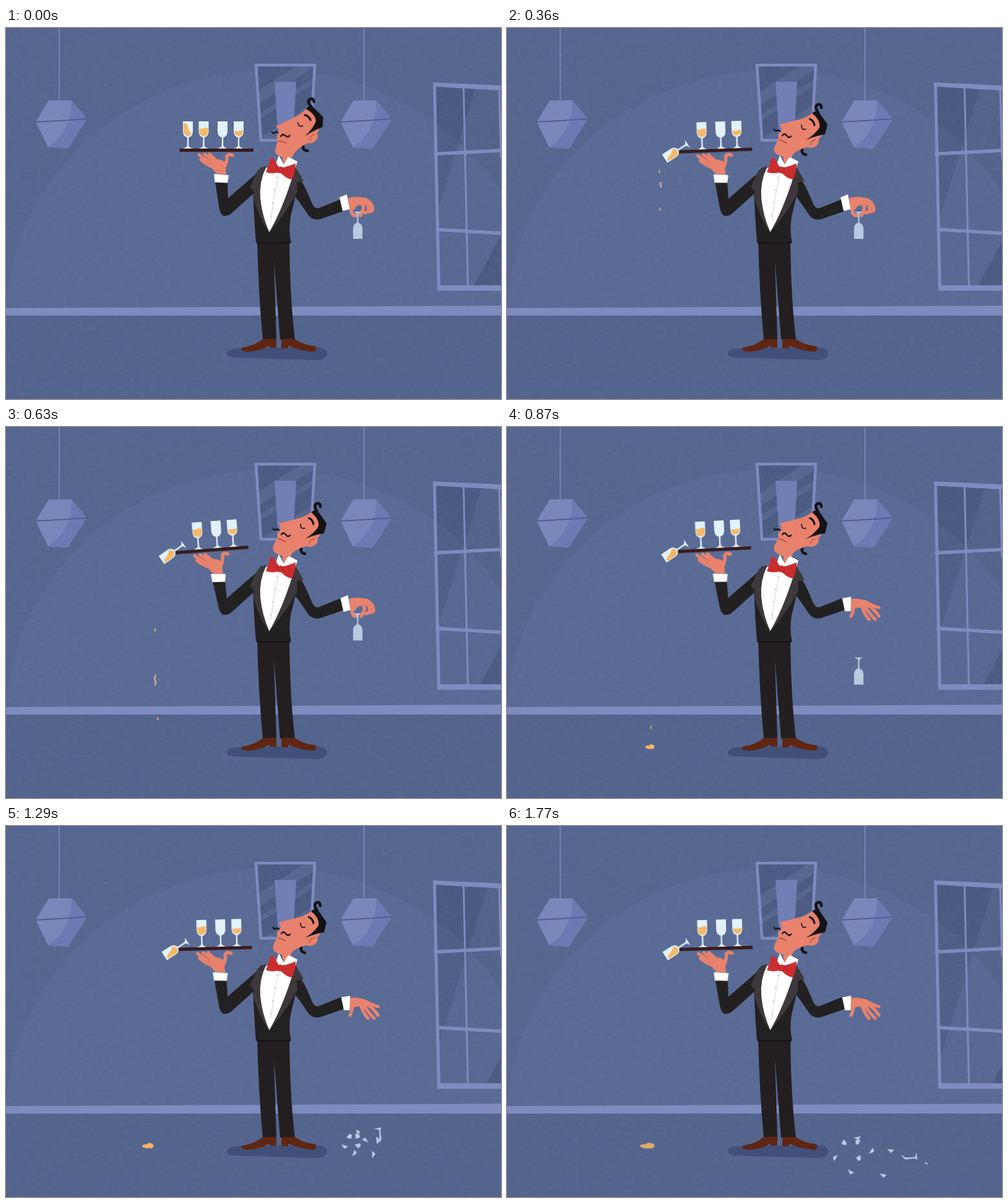
An HTML page that plays this animation: 800 by 600 pixels, repeating every 1800 ms.

```html
<!DOCTYPE html>
<html lang="en">
<head>
<meta charset="utf-8">
<title>Waiter</title>
<style>
html, body { margin: 0; width: 100%; height: 100%; overflow: hidden; background: #55668f; }
svg { position: absolute; inset: 0; width: 100%; height: 100%; display: block; }
.layer { will-change: transform; }
.line { fill: none; stroke-linecap: round; stroke-linejoin: round; }
.skin { fill: #e8826d; }
.line.skin { fill: none; stroke: #e8826d; }
.suit { fill: #232021; }
.lapel { fill: #3c383b; }
.trim { fill: #7f8cc0; }
.hair { fill: #151214; }
.line.hair { fill: none; stroke: #151214; }

.glare, .stripes, .head, .arm, .tipper, .drop, .puddle, .grip, .open, .fall, .shard, .stem, .chip {
  animation: 1.8s linear infinite;
}
.glare { animation-name: glare; }
.stripes { animation-name: stripes; }
.head { animation-name: head; transform-origin: 452px 178px; }
.arm { animation-name: arm; transform-origin: 354px 303px; }
.tipper { animation-name: tip; }
.grip { animation-name: grip; }
.open { animation-name: open; }
.fall { animation-name: fall; }
.puddle { animation-name: puddle; transform-origin: 238px 517px; }
.shard { animation-name: burst; }
.stem { animation-name: stem; }
.chip { animation-name: chip; }

@keyframes glare { to { transform: translateX(28px); } }
@keyframes stripes { to { transform: translateY(12px); } }
@keyframes head {
  0% { transform: rotate(-11deg); animation-timing-function: cubic-bezier(.3, 0, .4, 1); }
  15%, 100% { transform: none; }
}
@keyframes arm {
  0%, 5% { transform: rotate(0deg); animation-timing-function: cubic-bezier(.37, 0, .63, 1); }
  36% { transform: rotate(-4.35deg); animation-timing-function: cubic-bezier(.37, 0, .63, 1); }
  64% { transform: rotate(-.95deg); animation-timing-function: cubic-bezier(.37, 0, .63, 1); }
  85% { transform: rotate(-2.75deg); animation-timing-function: cubic-bezier(.4, 0, .7, .6); }
  100% { transform: rotate(-1.43deg); }
}
@keyframes tip {
  0% { transform: translate(294px, 195px) rotate(0deg); animation-timing-function: cubic-bezier(.4, 0, .8, .6); }
  10% { transform: translate(297px, 184px) rotate(-128deg); }
  13% { transform: translate(296px, 185.5px) rotate(-117deg); }
  16%, 100% { transform: translate(296px, 185px) rotate(-121deg); }
}
/* quadratic ease-in stands for gravity */
@keyframes dropA {
  0% { opacity: 0; transform: translate(248px, 215px); animation-timing-function: step-end; }
  1.7% { opacity: 1; transform: translate(248px, 215px); animation-timing-function: cubic-bezier(.333, 0, .667, .333); }
  37.8% { opacity: 1; transform: translate(244.5px, 515px); animation-timing-function: step-start; }
  37.9%, 100% { opacity: 0; transform: translate(244.5px, 515px); }
}
@keyframes dropB {
  0% { opacity: 0; transform: translate(250px, 215px) scaleY(.5); animation-timing-function: step-end; }
  8% { opacity: 1; transform: translate(250px, 215px) scaleY(.4); animation-timing-function: cubic-bezier(.333, 0, .667, .333); }
  41.6% { opacity: 1; transform: translate(236px, 515px) scaleY(1.3); animation-timing-function: step-start; }
  41.7%, 100% { opacity: 0; transform: translate(236px, 515px); }
}
@keyframes dropC {
  0% { opacity: 0; transform: translate(247px, 215px); animation-timing-function: step-end; }
  10.7% { opacity: 1; transform: translate(247px, 215px); animation-timing-function: cubic-bezier(.333, 0, .667, .333); }
  50.4% { opacity: 1; transform: translate(231px, 515px); animation-timing-function: step-start; }
  50.5%, 100% { opacity: 0; transform: translate(231px, 515px); }
}
@keyframes puddle {
  0%, 37.8% { transform: scale(0); }
  42% { transform: scale(.5, .7); }
  48.3% { transform: scale(.63, .82); }
  60% { transform: scale(.7, .86); }
  83.3% { transform: scale(.85, .95); }
  90% { opacity: 1; }
  100% { transform: scale(1.02, 1); opacity: .8; }
}
@keyframes grip {
  0%, 29% { transform: none; opacity: 1; }
  35% { transform: translate(1.5px, 3px); opacity: 1; animation-timing-function: step-end; }
  36.1%, 100% { transform: translate(1.5px, 3px); opacity: 0; }
}
@keyframes open {
  0% { opacity: 0; animation-timing-function: step-end; }
  36.1%, 100% { opacity: 1; }
}
@keyframes fall {
  0%, 30% { transform: none; opacity: 1; }
  35% { transform: translateY(4px); }
  40% { transform: translateY(23px); }
  48.3% { transform: translateY(75px); }
  60% { transform: translateY(154px); }
  65.5% { transform: translateY(196px); opacity: 1; animation-timing-function: step-start; }
  65.6%, 100% { transform: translateY(196px); opacity: 0; }
}
@keyframes burst {
  0% { opacity: 0; transform: translate(569px, 532px); animation-timing-function: step-end; }
  65.5% { opacity: 1; transform: translate(569px, 532px); animation-timing-function: ease-out; }
  70% {
    opacity: 1;
    transform: translate(calc((569px + var(--x)) / 2), calc((532px + var(--y)) / 2 - 22px)) rotate(calc(var(--r) - 120deg));
    animation-timing-function: ease-in;
  }
  75%, 100% { opacity: 1; transform: translate(var(--x), var(--y)) rotate(var(--r)); }
}
@keyframes stem {
  0% { opacity: 0; transform: translate(569px, 520px) rotate(-180deg); animation-timing-function: step-end; }
  65.5% { opacity: 1; transform: translate(569px, 520px) rotate(-180deg); }
  72% { opacity: 1; transform: translate(604px, 500px) rotate(-90deg); }
  78% { opacity: 1; transform: translate(630px, 526px) rotate(-20deg); }
  83.3% { opacity: 1; transform: translate(639px, 531px) rotate(-8deg); }
  91%, 100% { opacity: 1; transform: translate(650px, 535px) rotate(-2deg); }
}
@keyframes chip {
  0% { opacity: 0; transform: translate(654px, 532px); animation-timing-function: step-end; }
  85% { opacity: 1; transform: translate(654px, 532px); animation-timing-function: ease-out; }
  94%, 100% { opacity: 1; transform: translate(677px, 545px) rotate(30deg); }
}
</style>
</head>
<body>

<!-- room -->
<svg viewBox="0 0 800 600" preserveAspectRatio="none">
  <defs>
    <clipPath id="wall"><rect width="800" height="454"/></clipPath>
    <clipPath id="pane"><path d="M694 93L800 98V418H698Z"/></clipPath>
    <clipPath id="mirror"><path d="M406 62H498L490 180H413Z"/></clipPath>
    <g id="lamp">
      <path d="M86 0V118" stroke="#7f8cc0" stroke-width="1.6"/>
      <path d="M69 117H106L131 147L100 195L68 193L48 152Z" fill="#7a87bb"/>
      <path d="M106 117L131 147L100 195L68 193Q106 168 106 117Z" fill="#6c7ab2"/>
      <path d="M48 152Q88 150 131 147" class="line" stroke="#4f5e91" stroke-width="2"/>
    </g>
  </defs>
  <rect width="800" height="600" fill="#55668f"/>
  <rect y="458" width="800" height="142" fill="#53648d"/>

  <g clip-path="url(#pane)">
    <rect x="690" y="88" width="110" height="340" fill="#4a5a81"/>
    <g class="glare">
      <path d="M761 90L657 425H752L830 280V90Z" fill="#53648b"/>
      <path d="M800 335L752 425H830V300Z" fill="#455579"/>
    </g>
  </g>
  <g clip-path="url(#wall)"><ellipse cx="430" cy="470" rx="430" ry="402" fill="#8fa0d8" opacity=".085"/></g>
  <path class="trim" d="M690 88L800 93V101L695 95L702 416H800V425H697Z"/>
  <g class="line" stroke="#7f8cc0">
    <path d="M739.5 96L746.5 417" stroke-width="3"/>
    <path d="M694 203.500L802 198M697 326L802 332" stroke-width="5.500"/>
    <path d="M797 97L800 210" stroke-width="3"/>
  </g>

  <g clip-path="url(#mirror)">
    <rect x="400" y="56" width="104" height="130" fill="#4b5b83"/>
    <g class="stripes" fill="#566790">
      <path d="M404 104L500 40V62L404 126Z"/>
      <path d="M404 142L500 78V88L404 152Z"/>
      <path d="M404 182L500 118V150L404 214Z"/>
    </g>
  </g>
  <path d="M434 87H469L464 181H440Z" fill="#717fb5"/>
  <path d="M404 60H499L492 181.500H412Z" class="line" style="stroke-linejoin:miter" stroke="#7f8cc0" stroke-width="4.500"/>

  <path class="trim" d="M0 453L800 449V465H0Z"/>
  <use href="#lamp"/>
  <use href="#lamp" x="492.500"/>
</svg>

<!-- faint paper grain -->
<svg class="layer" viewBox="0 0 800 600" preserveAspectRatio="none">
  <filter id="grain" x="0" y="0" width="100%" height="100%">
    <feTurbulence type="fractalNoise" baseFrequency=".12 .2" numOctaves="3" seed="4"/>
    <feColorMatrix values="0 0 0 0 .2  0 0 0 0 .25  0 0 0 0 .45  1.4 0 0 0 -.6"/>
  </filter>
  <rect width="800" height="600" filter="url(#grain)" opacity=".22"/>
</svg>

<!-- waiter and glasses -->
<svg class="layer" viewBox="0 0 800 600" preserveAspectRatio="none">
  <defs>
    <path id="glass" d="M-8 0Q-1.500 -2 -1.200 -5V-18Q-8 -20 -8 -28V-44H8V-28Q8 -20 1.200 -18V-5Q1.500 -2 8 0Z"/>
    <path id="wine" d="M-7 -33Q-3 -31 0 -33T7 -33V-27Q6.500 -20.500 0 -20Q-6.500 -20.500 -7 -27Z"/>
    <path id="bit" d="M-4 3L-2 -5L4 0L3 4Z"/>
    <path id="sliver" d="M-5 3L5 -3L4 4Z"/>
  </defs>

  <path d="M372 518L503 516Q519 518 519.500 527Q517 537 500 537L375 533Q357 533 357 527Q358 519 372 518Z" fill="#424f79"/>

  <g fill="#fbb863">
    <path class="puddle" d="M215 517Q217 514 223 515Q228 511 234 513Q240 515 238 519Q235 523 229 521Q223 523 219 520Q215 520 215 517Z"/>
    <path class="drop" style="animation-name:dropA" d="M0 -3Q2 1 1 3Q-1 3 -1 1Z"/>
    <path class="drop line" style="animation-name:dropB" d="M1 -8Q-2 -3 0 0T0 8" stroke="#f3b98a" stroke-width="2"/>
    <path class="drop" style="animation-name:dropC" d="M0 -3Q2 1 1 3Q-1 3 -1 1Z"/>
  </g>

  <!-- legs -->
  <path d="M406 344H458Q459 440 467 504H443L433 376L437 504H415Q408 430 406 344Z" fill="#231f20"/>
  <g fill="#5f2613">
    <path d="M415 503H437V517H426L425 514Q410 523 390 523.500Q378 523 381 517Q402 514 415 503Z"/>
    <path d="M445 503H467Q480 513 500 514.500Q504 523 496 523.500Q474 522 457 514L456 518H445Z"/>
  </g>

  <!-- arm with tray -->
  <path class="suit" d="M358 276L404 236L414 224L404 264L364 300Q354 308 347 298Z"/>
  <g class="arm">
    <path class="suit" d="M338 248H358L359 280Q361 302 353 304Q346 303 344 288Z"/>
    <path d="M336 236L360 238L358 250.500L337.500 249.500Z" fill="#fff"/>
    <path class="skin" d="M341 236Q329 226 332 217Q343 208 354 217L356 237Z"/>
    <g class="line skin" stroke-width="5">
      <path d="M342 228Q326 223 315 213M340 222Q325 216 312 205M339 218Q329 211 321 204M343 217Q335 210 329 204"/>
      <path d="M351 229Q358 216 357 207Q360 203 366 206" stroke-width="5.500"/>
    </g>
    <path d="M331 217L324 209" class="line" stroke="#c9614f" stroke-width="1"/>
    <rect x="280.500" y="195" width="119.500" height="5.200" fill="#371b1d"/>
    <g fill="#e2f2fc">
      <use href="#glass" x="319.500" y="195"/>
      <use href="#glass" x="350" y="195"/>
      <use href="#glass" x="376" y="195"/>
    </g>
    <g fill="#f6b868">
      <use href="#wine" x="319.500" y="195"/>
      <path d="M369 166Q376 168 383 165Q384 174 376 175Q369 174 369 166Z"/>
    </g>
    <g class="tipper">
      <use href="#glass" fill="#e2f2fc"/>
      <path d="M-7 -41Q-3 -43 -1 -38Q1 -29 6 -25Q4 -20 0 -20Q-6 -21 -7 -27Z" fill="#f6b868"/>
    </g>
  </g>

  <!-- other arm -->
  <path class="suit" d="M468 236Q481 249 493 280Q498 294 506 291L541 277L546 296L508 309Q495 312 488 302Q475 282 462 266Z"/>
  <g class="grip">
    <path d="M539 274L551 269L555.500 293L544 296Z" fill="#fff"/>
    <path class="skin" d="M553 275Q570 270 584 277L580 288Q566 283 563 294L555 291Z"/>
    <g class="line skin" stroke-width="5.500">
      <path d="M580 277Q593 282 592.500 295L588 297M576 280Q590 286 585 297L580 299M572 281Q580 288 577 294L573 303"/>
      <path d="M558 284V297Q560 304 566 303"/>
    </g>
  </g>
  <g class="open">
    <path d="M542 277L556 274.500L555.500 298L546 298Z" fill="#fff"/>
    <path class="skin" d="M556 278Q572 276 587 284L582 296Q570 289 562 294L556 294Z"/>
    <g class="line skin" stroke-width="5.200">
      <path d="M580 283Q592 290 601 292M580 286Q594 294 601 306M577 288Q585 301 595 311M573 287Q577 303 585 311"/>
      <path d="M559 286Q561 297 556 306"/>
    </g>
  </g>
  <g class="fall"><use href="#glass" transform="translate(568.500 297) rotate(180) scale(.95 1)" fill="#b8cae0"/></g>

  <!-- jacket and shirt -->
  <path class="suit" d="M411 226L399 262Q401 310 404 347H461Q456 328 460 305Q466 280 473 250L466 224Z"/>
  <path d="M406 347.500H459" class="line" stroke="#0f0c0d" stroke-width="1.500"/>
  <path class="lapel" d="M419 223L407 230L394 257L401 265L399 273Q408 305 425 331L440 260Z"/>
  <path class="lapel" d="M465 220L481 247L470 250L471 265Q452 300 425 331L440 250Z"/>
  <path d="M420 226Q409 248 411 275Q414 305 425.500 330Q446 295 464 238L452 222Z" fill="#fff"/>
  <path d="M441 236Q433 270 428 312" class="line" stroke="#d5d4d8" stroke-width="1"/>
  <g fill="#b9b8be"><circle cx="438" cy="242" r="1"/><circle cx="434" cy="262" r="1"/><circle cx="431" cy="283" r="1"/><circle cx="428" cy="304" r="1"/></g>

  <path class="skin" d="M445 198L468 195L458 212L449 224Z"/>
  <path d="M441 206L449 221L456 208L471 216L466 230L447 232L436 220Z" fill="#fff"/>
  <path class="skin" d="M445 204H459L449 219Z"/>

  <!-- head -->
  <g class="head">
    <path class="line hair" d="M479 191Q473 203 483 205" stroke-width="4.500"/>
    <path class="skin" d="M440 156L468 149Q486 145 496 135L513 152L507 176Q497 189 485 193Q464 198 456 211L439 206Q429 201 432 193L439 178Q436 172 442 168Q447 164 440 156Z"/>
    <path class="hair" d="M493 138Q499 131 507 140L518 156L514 172Q500 174 483 181Q498 172 505 161Q507 149 493 138Z"/>
    <path class="line hair" d="M508 129Q508 122 502 124Q496 127 503 137" stroke-width="4.500"/>
    <ellipse class="skin" cx="494" cy="185.500" rx="10.500" ry="7.500" transform="rotate(-30 494 185.500)"/>
    <path d="M490 189Q491 182 498 181" class="line" stroke="#b9503f" stroke-width="1.300"/>
    <path class="line hair" d="M489.500 147.500Q495 149 497 157" stroke-width="3.200"/>
    <path class="line hair" d="M476 157Q476 166 483 163.500" stroke-width="1.500"/>
    <path class="line hair" d="M432 164Q433 168 436 166T441 167M445 174Q448 169 452 174Q456 179 459 175" stroke-width="2.400"/>
    <path d="M440 181Q446 182 452 186" class="line" stroke="#b5443c" stroke-width="1.500"/>
  </g>

  <!-- bow tie -->
  <g fill="#cb2d2f">
    <path d="M441 225L431 209Q425 211 425 220L420 233Q431 237 441 233Z"/>
    <path d="M446 226Q456 224 468 219Q468 234 462 245Q452 243 445 235Z"/>
    <circle cx="443.500" cy="229.500" r="5.500"/>
  </g>
  <path d="M440 225Q438 229 440 234M448 226Q449 231 446 236" class="line" stroke="#a62126" stroke-width="1"/>

  <!-- broken glass -->
  <g fill="#bccce4">
    <use href="#bit" class="shard" style="--x:545px;--y:512px;--r:10deg"/>
    <use href="#sliver" class="shard" style="--x:566px;--y:503px;--r:20deg"/>
    <use href="#bit" class="shard" style="--x:567px;--y:511px;--r:80deg"/>
    <use href="#sliver" class="shard" style="--x:588px;--y:525px;--r:-25deg"/>
    <use href="#sliver" class="shard" style="--x:532px;--y:537px;--r:150deg"/>
    <use href="#bit" class="shard" style="--x:569px;--y:537px;--r:45deg"/>
    <use href="#sliver" class="shard" style="--x:556px;--y:558px;--r:60deg"/>
    <use href="#sliver" class="shard" style="--x:608px;--y:563px;--r:40deg"/>
    <use href="#sliver" class="shard" style="--x:620px;--y:523px;--r:35deg"/>
    <path class="stem" d="M-13 -4L-6 1L9 1Q11 -2 12 -7L13 6Q11 3 8 3L-6 4Q-10 2 -13 -4Z"/>
    <path class="chip" d="M-3 -1L3 -1L2 2Z"/>
  </g>
</svg>
</body>
</html>
```
